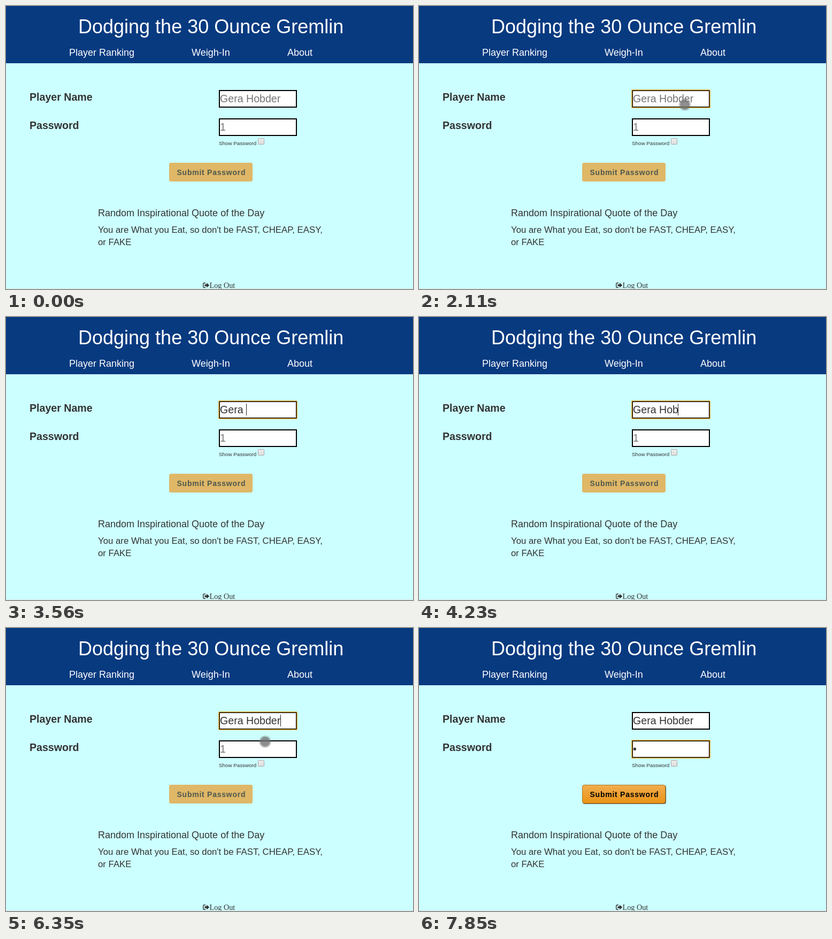
An HTML page that plays this animation: 761x529 px, repeating every 8 s.

```html
<!DOCTYPE html>
<html lang="en">
<head>
<meta charset="utf-8">
<title>Login form</title>
<style>
  html, body { margin: 0; width: 100%; height: 100%; overflow: hidden; background: #cff; }
  svg { display: block; }
  text { font-family: "Liberation Sans", Arial, sans-serif; fill: #333; white-space: pre; }
  .title { font-size: 36px; fill: #fff; }
  .nav { font-size: 18px; fill: #fff; }
  .label { font-size: 19.6px; font-weight: bold; }
  .input { font-size: 19.6px; }
  .hint { fill: #757575; }
  .small { font-size: 9.8px; }
  .button { font-size: 14px; font-weight: bold; letter-spacing: .75px; }
  .heading { font-size: 18px; }
  .quote { font-size: 16.8px; }
  .footer { font: 14.2px "Liberation Serif", "Times New Roman", serif; }
</style>
</head>
<body>
<svg width="761" height="529" viewBox="0 0 761 529">
  <defs>
    <linearGradient id="orange" x2="0" y2="1">
      <stop stop-color="#f0ad4e"/><stop offset="1" stop-color="#eb9316"/>
    </linearGradient>
    <linearGradient id="grey" x2="0" y2="1">
      <stop stop-color="#eee"/><stop offset="1" stop-color="#dcdcdc"/>
    </linearGradient>
    <g id="box">
      <rect x="399" y="158" width="144" height="31" fill="#fff" stroke="#000" stroke-width="2"/>
    </g>
  </defs>
  <rect width="761" height="529" fill="#cff"/>
  <rect width="761" height="107" fill="#083a80"/>
  <text class="title" x="135" y="51">Dodging the 30 Ounce Gremlin</text>
  <text class="nav" x="118" y="93">Player Ranking</text>
  <text class="nav" x="347" y="93">Weigh-In</text>
  <text class="nav" x="526" y="93">About</text>

  <text class="label" x="44" y="177">Player Name</text>
  <text class="label" x="44" y="230">Password</text>
  <use href="#box"/>
  <use href="#box" y="53"/>
  <rect id="focus" x="398" y="157" width="146" height="33" rx="1.5"
    fill="none" stroke="#e59700" stroke-width="2" opacity=".65"/>
  <text id="name" class="input" x="400" y="180"></text>
  <text id="password" class="input" x="400" y="233"></text>
  <rect id="caret" width="1" height="22" fill="#222"/>

  <text class="small" x="398" y="260">Show Password</text>
  <rect x="471.5" y="247.5" width="11" height="11" rx="1" fill="url(#grey)" stroke="#a9a9a9"/>

  <g id="disabled">
    <rect x="305" y="293" width="156" height="35" rx="3.5" fill="#dfb767"/>
    <text class="button" x="319.5" y="316" style="fill:#4e584e">Submit Password</text>
  </g>
  <g id="enabled">
    <rect x="306" y="294" width="156" height="35" rx="4" fill="#6b5a3c"/>
    <rect x="305.5" y="293.5" width="155" height="34" rx="3.5" fill="url(#orange)" stroke="#b07828"/>
    <text class="button" x="319.5" y="316" style="fill:#000">Submit Password</text>
  </g>

  <text class="heading" x="172" y="393">Random Inspirational Quote of the Day</text>
  <text class="quote" x="172" y="424">You are What you Eat, so don't be FAST, CHEAP, EASY,</text>
  <text class="quote" x="172" y="447">or FAKE</text>

  <path d="M373 517.8h-2.4q-1.8 0-1.8 1.8v4.8q0 1.8 1.8 1.8h2.4" fill="none" stroke="#333" stroke-width="1.4"/>
  <path d="M371.5 520.3h3.6v-2.8l5.2 4.5-5.2 4.5v-2.8h-3.6z" fill="#333"/>
  <text class="footer" x="380.5" y="527">Log Out</text>
  <rect y="528" width="761" height="1" fill="#dde6e6"/>

  <g id="pointer" fill="#707070">
    <circle r="11.2" opacity=".4"/>
    <circle r="9" opacity=".65"/>
  </g>
</svg>
<script>
const DURATION = 8000;
const PLAYER = "Gera Hobder";
const FIELD_GAP = 53;
const keyTimes = [2740, 2990, 3060, 3440, 3560, 3860, 3920, 4230, 4650, 4790, 4970];
const FOCUS_NAME = 1700, FOCUS_PASSWORD = 6590, PASSWORD_KEY = 7390;

const pointerSteps = [
  [0, null], [1240, [0, 0]], [1420, [497, 184.5]], [2560, null],
  [6230, [0, 0]], [6350, [484.5, 212.5]], [6480, [480, 221]],
  [6640, [0, 0]], [6780, [479.5, 220.5]], [7780, null]
];
const caretSteps = [
  [0, false], [1700, true], [2110, false], [2610, true], [5470, false],
  [5970, true], [6480, false], [6590, true], [7090, false],
  [7390, true], [7850, false]
];

const el = id => document.getElementById(id);
const show = (node, on) => node.setAttribute("visibility", on ? "visible" : "hidden");
const valueAt = (steps, t) => steps.filter(([start]) => start <= t).pop()[1];

function setInput(node, typed, hint) {
  node.textContent = typed || hint;
  node.classList.toggle("hint", !typed);
  return typed ? node.getComputedTextLength() : 0;
}

function render(t) {
  const typed = PLAYER.slice(0, keyTimes.filter(time => time <= t).length);
  const secret = t >= PASSWORD_KEY ? "•" : "";
  const nameWidth = setInput(el("name"), typed, PLAYER);
  const secretWidth = setInput(el("password"), secret, "1");

  const onPassword = t >= FOCUS_PASSWORD;
  const shift = onPassword ? FIELD_GAP : 0;
  show(el("focus"), t >= FOCUS_NAME);
  el("focus").setAttribute("transform", `translate(0 ${shift})`);

  const width = onPassword ? secretWidth : nameWidth;
  el("caret").setAttribute("x", Math.floor(400 + width));
  el("caret").setAttribute("y", (width ? 162 : 163) + shift);
  show(el("caret"), valueAt(caretSteps, t));

  show(el("enabled"), secret);
  show(el("disabled"), !secret);

  const spot = valueAt(pointerSteps, t);
  show(el("pointer"), spot);
  if (spot) el("pointer").setAttribute("transform", `translate(${spot})`);
}

const start = performance.now();
function tick() {
  render((performance.now() - start) % DURATION);
  requestAnimationFrame(tick);
}
tick();
</script>
</body>
</html>
```
